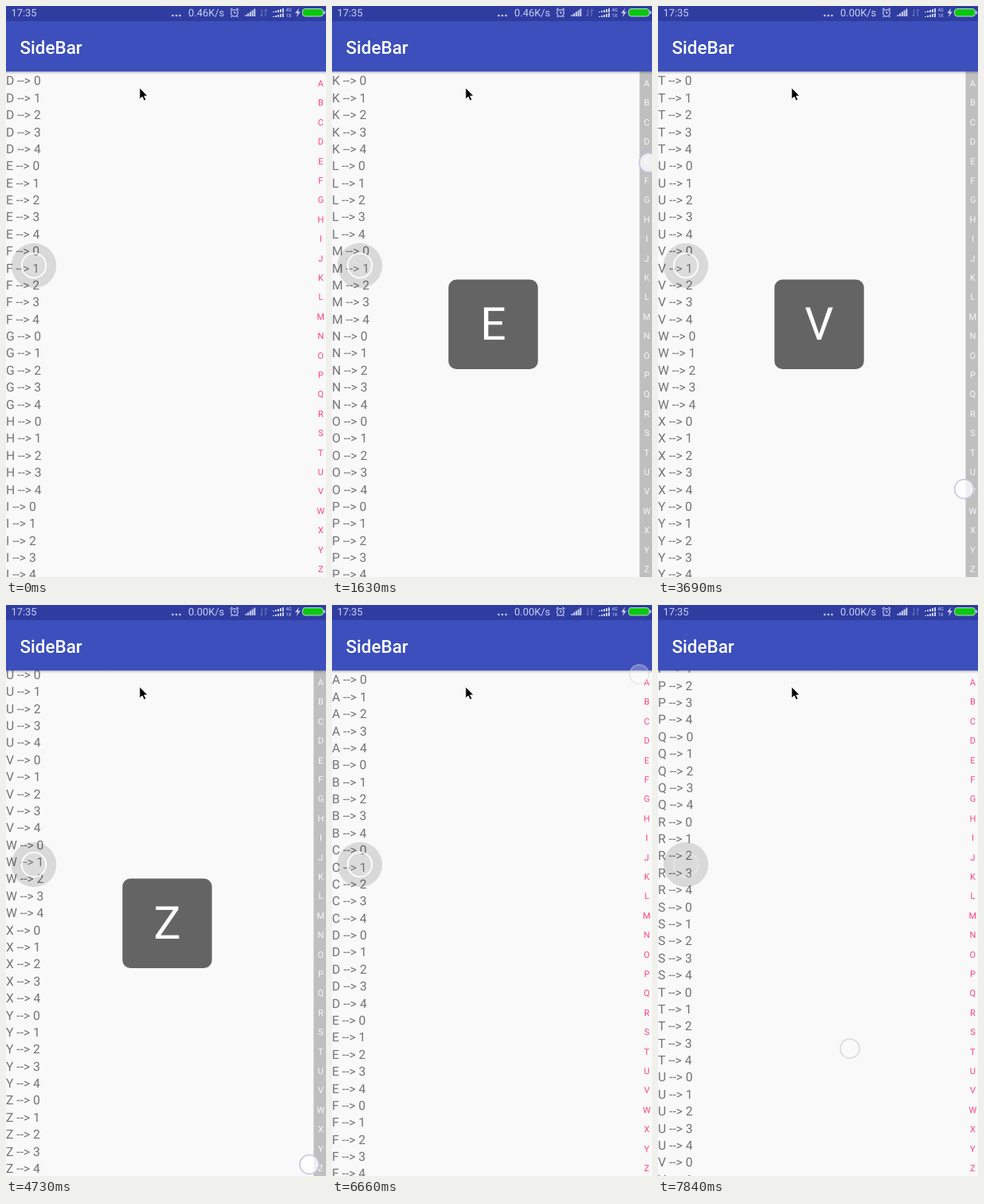
These frames come from a looping animation (402x717 px, 7990 ms). An HTML page:

```html
<!DOCTYPE html>
<html lang="en">
<head>
<meta charset="utf-8">
<title>SideBar</title>
<style>
  html, body { margin: 0; width: 100%; height: 100%; overflow: hidden; background: #f9f9f9; }
  svg { display: block; width: 402px; height: 717px; font-family: Roboto, "Noto Sans", sans-serif; }
  text { text-rendering: geometricPrecision; white-space: pre; }
  #list { font-size: 15.7px; fill: #737373; }
  #index { font-size: 11px; text-anchor: middle; }
  #status { font-size: 12.9px; fill: #c9cff0; }
</style>
</head>
<body>
<svg viewBox="0 0 402 717">
  <rect width="402" height="717" fill="#f9f9f9"/>
  <g id="list"></g>
  <rect id="strip" x="386.4" y="82" width="16" height="635" fill="#bfbfbf"/>
  <g id="index"></g>

  <g id="dialog">
    <rect x="146.3" y="343.5" width="112.4" height="112.4" rx="10" fill="#646464"/>
    <text id="big" x="202.5" y="419" font-size="57" text-anchor="middle" fill="#fff"></text>
  </g>

  <defs>
    <linearGradient id="shade" x2="0" y2="1">
      <stop offset="0" stop-color="#000" stop-opacity=".22"/>
      <stop offset="1" stop-color="#000" stop-opacity="0"/>
    </linearGradient>
  </defs>
  <rect y="82" width="402" height="4" fill="url(#shade)"/>
  <rect width="402" height="82.3" fill="#3c4fbc"/>
  <rect width="402" height="19" fill="#2f3da1"/>
  <text x="17.6" y="59.8" font-size="22.4" font-weight="500" fill="#fff">SideBar</text>

  <g id="status">
    <text x="6.5" y="13.4">17:35</text>
    <text id="speed" x="229" y="13.4"></text>
    <circle cx="209.5" cy="12" r="1.3"/><circle cx="214" cy="12" r="1.3"/><circle cx="218.5" cy="12" r="1.3"/>
    <g fill="none" stroke="#c9cff0" stroke-width="1.2">
      <circle cx="287" cy="8.8" r="4.3"/>
      <path d="M287 6.2V9h2M281.8 5l2.6-2.4M292.2 5l-2.6-2.4M284 12.6l-1.3 1.6M290 12.6l1.3 1.6"/>
      <path d="M321.5 4v9m-2-2.2l2 2.2M326 13V4m2 2.2L326 4" stroke="#6672bd"/>
    </g>
    <g id="bars"></g>
    <text x="351.5" y="7.4" font-size="6">4G</text>
    <text x="351.5" y="14.4" font-size="6">1X</text>
    <path d="M368.2 2.5l-5 6.5h3l-1.3 5 5-6.7h-3.1z"/>
    <rect x="372.5" y="3.5" width="26" height="9.5" rx="3.5" fill="#0bc710" stroke="#b9d9cf"/>
    <rect x="399.3" y="6.3" width="1.7" height="4" rx=".8"/>
  </g>

  <circle cx="35" cy="326" r="28.2" fill-opacity=".13"/>
  <circle id="ring" cx="35" cy="326" r="15.3" fill="#fff" fill-opacity=".1" stroke="#fff" stroke-width="1.8"/>
  <circle id="touch" r="12" fill="#fff" stroke-width="1.6"/>
  <path d="M167.8 102.5v14.6l3.3-3 2.3 4.9 2.6-1.2-2.3-4.7h4.5z" stroke="#fff"/>
</svg>

<script>
const LOOP = 7990, STEP = 147.96, LAST = 53;
const ROW = 21.38, CELL = 24.42, TOP = 83, MAX_SCROLL = 2144.5;
const LETTERS = "ABCDEFGHIJKLMNOPQRSTUVWXYZ";
const PRESS = 1, RELEASE = 45, SWIPE = 47;

// Turning points of the finger on the side bar
const turns = [
  { k: 1, x: 394, y: 146 }, { k: 9, x: 398, y: 400 }, { k: 12, x: 398, y: 129 },
  { k: 18, x: 391, y: 380 }, { k: 29, x: 382, y: 700 }, { k: 33, x: 381, y: 703 },
  { k: 39, x: 387, y: 272 }, { k: 44, x: 386, y: 87 }
];

const el = id => document.getElementById(id);
const mix = (a, b, p) => a + (b - a) * p;
const ease = p => (1 - Math.cos(Math.PI * p)) / 2;

function add(parent, tag, attrs, content = "") {
  const node = document.createElementNS("http://www.w3.org/2000/svg", tag);
  for (const name in attrs) node.setAttribute(name, attrs[name]);
  node.textContent = content;
  el(parent).append(node);
}

function addBars(x, base, pitch, rise) {
  for (let i = 0; i < 5; i++) {
    const height = rise * (i + 1);
    add("bars", "rect", { x: x + i * pitch, y: base - height, width: 2, height });
  }
}

[...LETTERS].forEach((letter, i) => {
  add("index", "text", { x: 395.4, y: 101 + i * 24.4 }, letter);
  for (let n = 0; n < 5; n++) {
    add("list", "text", { x: 0, y: 99.4 + (i * 5 + n) * ROW }, `${letter} --> ${n}`);
  }
});
addBars(300.5, 13, 2.7, 1.9);
addBars(335, 8, 3, 1);
addBars(335, 14, 3, 1);

function dragAt(k) {
  const t = Math.max(PRESS, Math.min(k, turns.at(-1).k));
  const i = Math.max(1, turns.findIndex(turn => turn.k >= t));
  const a = turns[i - 1], b = turns[i];
  const p = ease((t - a.k) / (b.k - a.k));
  return { x: mix(a.x, b.x, p), y: mix(a.y, b.y, p) };
}

// Repeated upward swipes, three steps each
function swipeAt(k) {
  const p = (k - SWIPE) % 3 / 2;
  return { x: mix(241, 265, p), y: mix(557, 403, p) };
}

function fingerAt(k) {
  if (k >= SWIPE) return swipeAt(k);
  return k >= PRESS && k <= RELEASE ? dragAt(k) : null;
}

function letterAt(k) {
  const i = Math.floor((dragAt(k).y - TOP) / CELL);
  return Math.max(0, Math.min(25, i));
}

// The list follows the selected letter one step late.
function scrollAt(k) {
  if (k < PRESS) return 15 * ROW;
  if (k < RELEASE) return Math.min(MAX_SCROLL, letterAt(k - 1) * 5 * ROW);
  const p = Math.max(0, k - SWIPE) / (LAST - SWIPE);
  return 1639 * p ** 1.3;
}

function show(id, visible) {
  el(id).setAttribute("visibility", visible ? "visible" : "hidden");
}

function render(time) {
  const k = Math.min(LAST, Math.floor((time % LOOP + 10) / STEP));
  const pressed = k >= PRESS && k < RELEASE;
  const finger = fingerAt(k);

  el("list").setAttribute("transform", `translate(0 ${-scrollAt(k)})`);
  el("index").setAttribute("fill", pressed ? "#f8f8f8" : "#ff4081");
  show("strip", pressed);
  show("dialog", pressed);
  el("big").textContent = LETTERS[letterAt(k)];
  el("speed").textContent = k < 14 ? "0.46K/s" : "0.00K/s";
  el("ring").setAttribute("opacity", k < SWIPE ? 1 : 0.3);

  show("touch", finger);
  if (finger) {
    const touch = el("touch");
    touch.setAttribute("cx", finger.x);
    touch.setAttribute("cy", finger.y);
    touch.setAttribute("stroke", pressed ? "#c6c4e2" : "#d8d8dc");
    touch.setAttribute("fill-opacity", pressed ? 0.75 : 0.25);
    touch.setAttribute("stroke-opacity", k === RELEASE ? 0.5 : 1);
  }
}

const start = performance.now();
function tick() {
  render(performance.now() - start);
  requestAnimationFrame(tick);
}
tick();
</script>
</body>
</html>
```
